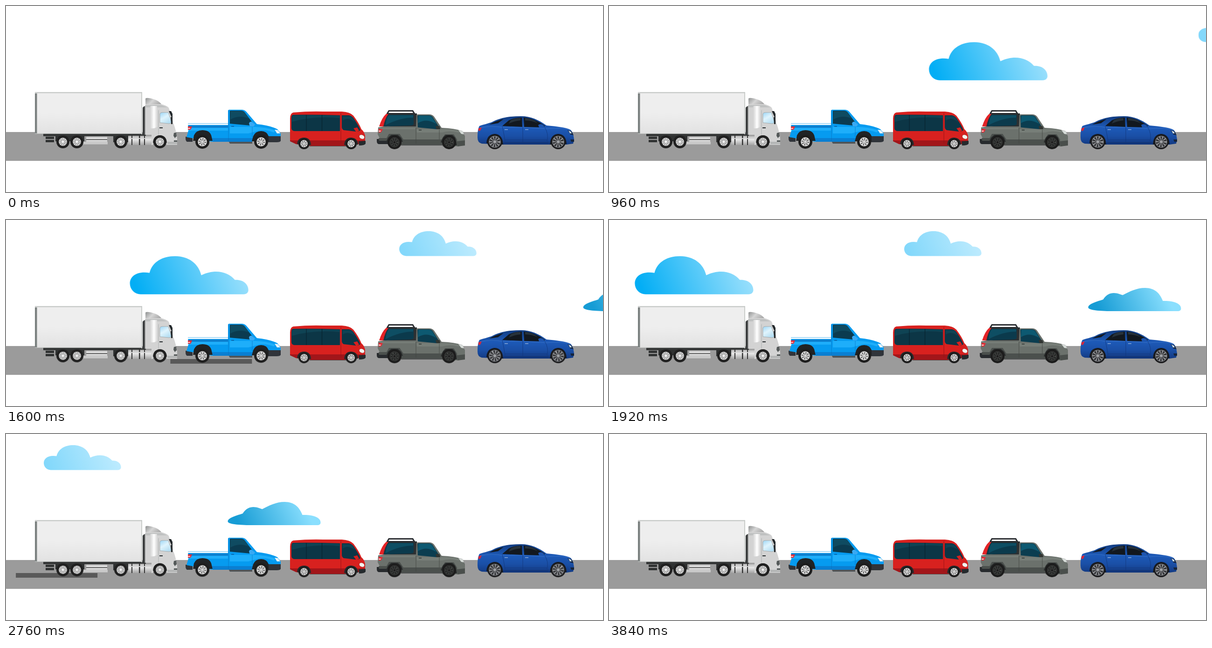
An HTML page for the animation above (3.88 s loop, 1280 by 400 pixels).

```html
<!DOCTYPE html>
<html lang="en">
<head>
<meta charset="utf-8">
<title>Traffic</title>
<style>
  html, body { margin: 0; width: 100%; height: 100%; overflow: hidden; background: #fff; }
  svg { display: block; width: 1280px; height: 400px; }
  .clouds, .dashes, .spin { animation: 3880ms linear infinite; }
  .clouds { animation-name: drift; }
  .dashes { animation-name: pass; }
  .spin { animation-name: spin; }
  @keyframes drift { to { transform: translateX(-2549.2px); } }
  @keyframes pass { to { transform: translateX(-6426.25px); } }
  @keyframes spin { to { transform: rotate(1455deg); } }
</style>
</head>
<body>
<svg viewBox="0 0 1280 400">
  <defs>
    <linearGradient id="sky" gradientUnits="userSpaceOnUse" x1="20" y1="85" x2="225" y2="0">
      <stop stop-color="#03aef5"/><stop offset="1" stop-color="#98dffc"/>
    </linearGradient>
    <linearGradient id="pale" gradientUnits="userSpaceOnUse" x1="20" y1="85" x2="225" y2="0">
      <stop stop-color="#83d8fb"/><stop offset="1" stop-color="#bdebfe"/>
    </linearGradient>
    <linearGradient id="deep" gradientUnits="userSpaceOnUse" x1="30" y1="62" x2="160" y2="0">
      <stop stop-color="#169cd5"/><stop offset="1" stop-color="#8adffe"/>
    </linearGradient>
    <linearGradient id="box" x2="0" y2="1">
      <stop stop-color="#eee"/><stop offset=".5" stop-color="#eee"/><stop offset="1" stop-color="#e2e2e2"/>
    </linearGradient>
    <linearGradient id="fairing">
      <stop stop-color="#d2d2d2"/><stop offset=".55" stop-color="#fff"/><stop offset="1" stop-color="#d8d8d8"/>
    </linearGradient>
    <linearGradient id="spoiler" x2="1" y2=".5">
      <stop stop-color="#8e9090"/><stop offset=".5" stop-color="#d5d5d5"/><stop offset="1" stop-color="#aaa"/>
    </linearGradient>
    <linearGradient id="metal" x2="0" y2="1">
      <stop stop-color="#aaa"/><stop offset=".35" stop-color="#ededed"/><stop offset="1" stop-color="#a4a4a4"/>
    </linearGradient>
    <linearGradient id="glass" x2=".6" y2="1">
      <stop stop-color="#9dd6f5"/><stop offset=".5" stop-color="#e0f4fd"/><stop offset="1" stop-color="#b5def2"/>
    </linearGradient>
    <linearGradient id="navy" x2="0" y2="1">
      <stop stop-color="#123c80"/><stop offset=".4" stop-color="#1d5ab8"/><stop offset=".7" stop-color="#1a4fa6"/><stop offset="1" stop-color="#133a82"/>
    </linearGradient>

    <path id="cloud" d="M23 82A23 23 0 0 1 0 59C0 43 15 32 42 36C48 12 70 0 97 0C126 0 147 16 153 41C182 27 210 33 225 51C243 50 254 60 254 73C254 78 250 82 244 82Z"/>

    <g id="lorry">
      <circle r="10" fill="#202020"/>
      <circle r="6.300" fill="#d8d8d8"/>
      <circle r="4.400" fill="none" stroke="#777" stroke-width="1.400" pathLength="10" stroke-dasharray=".45 .55"/>
      <circle r="2.500" fill="#f0f0f0" stroke="#8b8b8b" stroke-width=".8"/>
    </g>
    <g id="alloy">
      <circle r="10" fill="#1d1d1d"/>
      <circle r="6.500" fill="#e0e0e0"/>
      <circle r="3.900" fill="none" stroke="#6a6a6a" stroke-width="3" pathLength="8" stroke-dasharray=".5 .5"/>
      <circle r="1.800" fill="#ddd" stroke="#888" stroke-width=".5"/>
    </g>
    <g id="offroad">
      <circle r="10" fill="#1c1c1c"/>
      <circle r="6.600" fill="#272928" stroke="#575957" stroke-width=".5"/>
      <circle r="4.500" fill="none" stroke="#5c5e5c" stroke-width="1.300" pathLength="8" stroke-dasharray=".3 .7"/>
      <circle r="2.200" fill="#1e1e1e" stroke="#666" stroke-width=".5"/>
    </g>
    <g id="sport">
      <circle r="10" fill="#1a1a1c"/>
      <circle r="7.600" fill="#38393c" stroke="#83868a" stroke-width=".7"/>
      <circle r="4.600" fill="none" stroke="#a9abaf" stroke-width="5.600" pathLength="10" stroke-dasharray=".3 .7"/>
      <circle r="1.900" fill="#a0a2a6"/>
    </g>
  </defs>

  <path fill="#9b9b9b" d="M0 271H1280V333H0Z"/>
  <g class="dashes" fill="#595959">
    <path d="M1414 299h175v10h-175zM3004 299h175v10h-175zM4594 299h175v10h-175zM6184 299h175v10h-175z"/>
  </g>

  <g class="clouds">
    <use href="#cloud" transform="translate(1317.5 77.7)" fill="url(#sky)"/>
    <use href="#cloud" transform="translate(1895 24) scale(.652)" fill="url(#pale)"/>
    <path transform="translate(2289.5 146)" fill="url(#deep)" d="M0 42C0 35 16 30 32 25C39 14 47 11 55 11C63 11 69 14 74 15.500C88 8 104 0 122 0C143 0 154 12 160 28C179 27 199 32 199 44C199 48 197 50 191 50H50C25 50 0 48 0 42Z"/>
  </g>

  <!-- lorry -->
  <g>
    <path fill="#303232" d="M80 274H300V280H80ZM85 281H103V286H85ZM85 288H103V293H85ZM106 277H168V291H106ZM230 277H262V293H230Z"/>
    <path stroke="#6a6c6c" stroke-dasharray="1 2" d="M82 277H294"/>
    <path fill="url(#metal)" d="M172 281H217V297H172ZM262 279H315V299H262Z"/>
    <path fill="#c9c9c9" d="M165 292H218V297.500H165Z"/>
    <path fill="#333" d="M172 286.500H217V288H172ZM269 279h2v20h-2zM285 279h2.500v20h-2.500zM296 279h2v20h-2z"/>
    <path fill="url(#box)" d="M62 185H292V275H62Z"/>
    <path fill="#c9ccca" d="M62 185H292V187.500H62ZM290 185H292V276H290ZM62 273.500H292V275H62Z"/>
    <path fill="#7c8281" d="M62 188H66.500V274H62Z"/>
    <path fill="#3c3e3f" d="M293 219Q295 215 300 215V277H293Z"/>
    <path fill="#a1a3a3" d="M297.500 215H300V277H297.500Z"/>
    <path fill="url(#spoiler)" d="M299 214V199Q301 197 306 198Q326 201 333 211V215Z"/>
    <path fill="#d3d3d3" d="M299 211H333Q345 214 349 219Q355 236 359 252Q365 269 367 284V298H344Q343 279 330 278Q318 278 315 299H312V277H299Z"/>
    <path fill="#bfc1c1" d="M298 213H333L346 218H300ZM326 277V225L328 223V276Z"/>
    <path fill="url(#fairing)" d="M309 216Q311 214 316 215H324V259Q322 264 309 263Z"/>
    <path fill="url(#glass)" stroke="#929696" stroke-width=".7" d="M330 251V232Q331 229 335 229H348L355 250Q353 253 349 253Z"/>
    <path fill="#252a2d" d="M349 226H354L357 232V239H355ZM353 239H357V254H354ZM329 261h7v2h-7z"/>
    <path fill="#535858" d="M360 273L365 272 366 280 362 284 359 279ZM360 289H367V294H360Z"/>
    <path fill="#b4b6b6" d="M346 292H367V297H346Z"/>
    <path fill="#2a2b2b" d="M315 294Q316 279 330 278Q344 279 345 294Z"/>
    <path fill="#d5d5d5" d="M262 284H315V286H262ZM344 297H367V298.500H344Z"/>
  </g>

  <!-- blue pickup -->
  <g>
    <path fill="#505457" d="M476 289H528V296H480Z"/>
    <path fill="#30343a" d="M385 281H400V292H388Q385 290 385 285ZM554 279H589V290Q588 293 580 293H555Z"/>
    <path fill="#069bf0" d="M390 252H476V226Q476 223 479 223H505Q511 223 515 227L538 254Q567 257 582 265L589 274V280H563Q558 270 546 271Q534 273 528 292H443L387 282 391 268Z"/>
    <path fill="#0c80d0" d="M391 257H476V262H391Z"/>
    <path fill="#1eaefa" d="M480 260H534Q560 261 578 268L574 272Q553 264 538 269L520 274H480ZM391 262H476V268H391Z"/>
    <path fill="#0a7fd2" d="M442 284H530L527 292H444Z"/>
    <path fill="#e9f5fc" d="M390 252.500H476V256H390Z"/>
    <path fill="none" stroke="#0a70bd" stroke-width=".7" d="M477 224V290M528 260V282"/>
    <path fill="#0b3b50" d="M480 226Q480 225 482 225H503Q509 225 512 229L530 253Q529 257 524 257L480 253Z"/>
    <path fill="#0f4b61" d="M482 226H503Q509 226 512 230L521 242Q500 233 481 244Z"/>
    <path fill="#39a9f3" d="M521 253Q522 248 527 249L534 255 531 259H523Z"/>
    <path fill="#075a9d" d="M483 258h6v1.500h-6z"/>
    <path fill="#e32b35" d="M390 259H399L396 266H390Z"/>
    <path fill="#fff" d="M389 262.500h6v1.500h-6z"/>
    <path fill="#e8f3f8" d="M576 266L583 267 588 274 581 274Z"/>
    <path fill="#202325" d="M401 290L403 278Q408 267 421 267Q436 267 440 278L443 290ZM527 291L530 280Q535 269 547 269Q559 269 563 280L563 291Z"/>
  </g>

  <!-- minibus -->
  <g>
    <path fill="#555" d="M651 297H730V302H651Z"/>
    <path fill="#d8211f" d="M609 242Q609 231 616 229Q650 226 680 227H720Q738 228 745 236Q757 252 762 265Q768 270 770 279V291L766 297H753L724 300H655L622 297 609 290Z"/>
    <path fill="#a2161a" d="M609 289H770L765 297H753L724 301H655L622 297 609 291Z"/>
    <path fill="#0c3646" d="M615 234Q655 233 716 235V269H618Q612 268 612 262V241Q612 235 615 234ZM720 235H735Q741 236 745 241Q756 257 760 267Q757 270 750 270L724 267Q720 265 720 260Z"/>
    <path fill="#0f4354" d="M613 241Q613 236 617 235Q655 234 715 236V241Q660 236 613 249ZM722 237H735Q741 237 744 242L749 250Q734 238 722 246Z"/>
    <path fill="none" stroke="#061f2a" d="M644 234V269M677.500 234V269"/>
    <path fill="none" stroke="#8f1217" stroke-width=".8" d="M718 230V296"/>
    <path fill="#d6201f" d="M745 263L753 261 757 268 751 271Z"/>
    <ellipse cx="763" cy="281.500" rx="6" ry="4.500" transform="rotate(25 763 281.500)" fill="#f4f5ef" stroke="#a32424" stroke-width=".8"/>
    <path fill="#252a2d" d="M756 291L771 290V296Q769 300 757 300Z"/>
    <path fill="#292a2c" d="M624 297Q625 283 639 283Q653 283 654 299ZM725 299Q726 283 740 283Q754 284 755 298Z"/>
  </g>

  <!-- grey pickup -->
  <g>
    <path fill="#4e5150" d="M847 293H936V300H847Z"/>
    <path fill="#282b2e" d="M795 286H820V297H799Q795 296 795 291Z"/>
    <path fill="#2c3032" d="M807 259Q810 240 817 231H881V261Z"/>
    <path fill="#e32327" d="M800 259Q806 240 815 232L820 232Q812 243 809 259Z"/>
    <path fill="#0b3a4c" d="M811 259Q813 241 820 234H874V254Q873 257 866 257Z"/>
    <path fill="#0e4e63" d="M821 235H873V240Q845 240 814 256Q815 241 821 235Z"/>
    <path fill="none" stroke="#2b2e32" stroke-width="3" d="M817 232L821 225.500H872L876 232"/>
    <path fill="none" stroke="#2b2e32" stroke-width="2" d="M816 231H877"/>
    <path fill="#6b716c" d="M798 261Q812 258 825 259H879L880 235Q880 233 883 233H907Q914 233 918 238L934 262Q962 263 979 269L984 280V299L968 302H936V297H847L802 286 797 276Z"/>
    <path fill="#777e78" d="M800 262H878V265H800ZM880 265H934Q958 264 975 270L970 272Q950 267 935 272H881Z"/>
    <path fill="#4b504d" d="M799 284H816L821 275H844L852 287H934L941 276H960L967 287V298H936V297H847V290H800Z"/>
    <path fill="#0b3d50" d="M882 237Q882 235 885 235H906Q912 235 915 239L930 263 924 265 883 261Z"/>
    <path fill="#0d5971" d="M884 236H906Q911 236 914 240L923 254Q902 240 883 252Z"/>
    <path fill="none" stroke="#414541" stroke-width=".8" d="M879 262V296M929 266V287"/>
    <path fill="#313532" d="M921 259Q924 256 930 259L931 265H923ZM885 266h6v1.500h-6z"/>
    <path fill="#e42b34" d="M799 264L808 265 804 272H799Z"/>
    <path fill="#f1e2de" d="M799 268H804L803 270H799Z"/>
    <path fill="#d7dcd9" d="M970 267L979 269 982 276 976 275Z"/>
    <path fill="#4a4f4c" d="M966 291L984 289V300L968 302Z"/>
    <path fill="#2a2d2d" d="M815 292L819 283 826 277H840L847 283 851 292ZM932 293L937 282 943 277H957L963 283 967 300H955Z"/>
  </g>

  <!-- sedan -->
  <g>
    <path fill="url(#navy)" d="M1011 283C1011 270 1012 264 1015 258C1026 254 1038 252 1045 248C1064 239 1084 237 1104 237C1126 237 1142 245 1159 257C1182 259 1200 261 1210 266C1216 271 1217 280 1218 287L1216 296 1202 298H1066L1020 296Q1011 294 1011 283Z"/>
    <path fill="none" stroke="#3670c6" stroke-width="1" d="M1015 262Q1044 256 1064 261H1108L1160 264Q1192 260 1209 267"/>
    <path fill="#12377c" d="M1068 292H1164V298H1066Z"/>
    <path fill="#12181f" d="M1036 255Q1050 247 1067 243L1055 252ZM1064 258L1078 246Q1090 240 1106 240L1107 260ZM1110 240Q1132 241 1156 258L1149 261 1111 260Z"/>
    <path fill="#27323b" d="M1082 246Q1090 241 1103 241V246Q1090 247 1078 253ZM1113 241Q1124 242 1134 247L1140 252Q1128 246 1113 246Z"/>
    <path fill="none" stroke="#12367a" stroke-width=".8" d="M1064 259Q1068 276 1070 291M1108 260V296M1155 261Q1164 275 1160 291M1070 288H1160"/>
    <path fill="#1d55b0" d="M1141 256Q1147 251 1154 258L1151 261H1143Z"/>
    <path fill="#8cabd8" d="M1069 265h7v1.400h-7zM1113 265h7v1.400h-7z"/>
    <path fill="#d5263b" d="M1013 263L1020 261 1017 268 1013 269Z"/>
    <path fill="#14243c" d="M1204 267L1212 269 1217 278 1210 276ZM1210 287H1218V292H1212Z"/>
    <path fill="#c4d7ed" d="M1206 268L1211 270 1213 274 1209 274Z"/>
    <path fill="#131c2b" d="M1030 295Q1031 276 1048 275Q1065 276 1066 298ZM1166 298Q1167 276 1184 275Q1201 276 1202 297Z"/>
  </g>

  <g id="wheels"></g>
</svg>
<script>
  const axles = [
    ["lorry", 14, 292, 122, 152, 246, 330],
    ["alloy", 15, 292, 421, 547],
    ["alloy", 12, 296, 639, 740],
    ["offroad", 15, 293, 833, 950],
    ["sport", 16, 292, 1048, 1184]
  ];
  document.getElementById("wheels").innerHTML = axles.map(([kind, r, y, ...xs]) =>
    xs.map(x => `<g transform="translate(${x} ${y}) scale(${r / 10})"><use class="spin" href="#${kind}"/></g>`).join("")
  ).join("");
</script>
</body>
</html>
```
